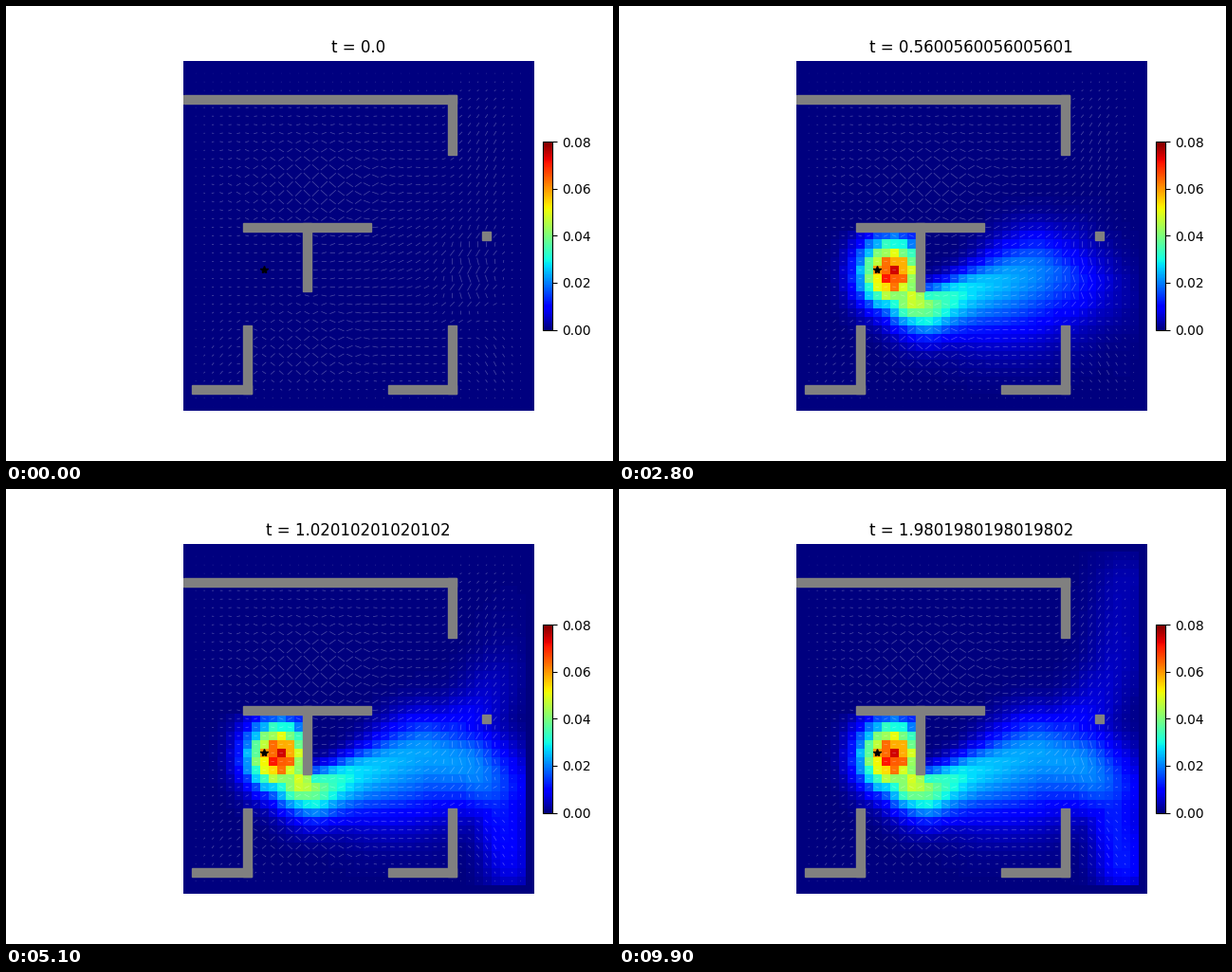
These frames come from a looping animation (640 px wide and 480 px high, 10 s). A matplotlib script:

```python
import numpy as np
import matplotlib.pyplot as plt
from matplotlib.animation import FuncAnimation
from matplotlib.patches import Rectangle

N = 41
FRAMES = 100
VMAX = 0.08
TIMES = np.linspace(0, 2, 10000)[::100]
SOURCE = (9, 24)

# first and last cell of each wall: column, row, column, row
WALLS = [
    (0, 4, 31, 4), (31, 4, 31, 10),
    (7, 19, 21, 19), (14, 19, 14, 26),
    (35, 20, 35, 20),
    (7, 31, 7, 38), (1, 38, 7, 38),
    (31, 31, 31, 38), (24, 38, 31, 38),
]

# key points of the two branches: arrival time, column, row
STREAM = [(.10, 13.3, 27.2), (.15, 14.8, 28), (.28, 20, 25.9),
          (.45, 27.5, 23.9), (.58, 32.5, 25.3), (.68, 36, 28.5),
          (.95, 37.6, 37)]
UPDRAFT = [(.55, 31, 22), (.75, 34, 19), (1.0, 36.5, 14), (1.4, 37.6, 4)]

row, col = np.mgrid[0:N, 0:N].astype(float)
edge = np.minimum(np.minimum(col, N - 1 - col), np.minimum(row, N - 1 - row))
check = (-1) ** (row + col)


def bump(c, r, sx, sy):
    return np.exp(-.5 * (((col - c) / sx) ** 2 + ((row - r) / sy) ** 2))


def step(t, at, width):
    return .5 * (1 + np.tanh((t - at) / width))


def trail(keys, level, up, down):
    """Steady profile around samples of a path, with their arrival times."""
    when, cs, rs = np.transpose(keys)
    t = np.linspace(when[0], when[-1], 80)[:, None, None]
    dx = col - np.interp(t, when, cs)
    dy = row - np.interp(t, when, rs)
    w = np.where(dy > 0, down(t), up(t))
    return level(t) * np.exp(-.5 * (dx ** 2 + dy ** 2) / w ** 2), t


TRAILS = [
    trail(STREAM,
          lambda t: .27 + .36 * np.exp((.1 - t) / .115)
          - .12 * step(t, .66, .05),
          lambda t: 1.3 + 2 * step(t, .36, .09) - step(t, .74, .06),
          lambda t: 2.2 + 2.7 * np.exp(-((t - .42) / .2) ** 2)),
    trail(UPDRAFT,
          lambda t: .045 + .13 * np.exp((.55 - t) / .2),
          lambda t: 2.5, lambda t: 2.5),
]
above_bar = (row < 20) & (col < 22)
BLOB = .89 * bump(10.7, 24.4, 2.5, 2.7) * (1 - .06 * check)
BLOB *= (row >= 20) & ((col < 14) | (row > 26))


def density(t):
    spread = 1 - np.exp(-t / .05)
    out = BLOB * (1 - np.exp(-t / .07))
    for shape, arrive in TRAILS:
        front = step(t, arrive, .05 + .16 * arrive)
        plume = (shape * front).max(axis=0) * spread
        out = np.maximum(out, np.where(above_bar, 0, plume))
    return VMAX * out * (edge > 0)


def wind():
    swirl = bump(33.5, 25.5, 3, 4)
    u = .25 + .5 * bump(17, 13, 9, 5) + .4 * bump(24, 26, 9, 6)
    u += .3 * bump(16, 34, 7, 4)
    u *= 1 - .9 * swirl
    u += .4 * (-1) ** row * swirl
    v = .75 * check * bump(14.5, 14, 6, 3.8)
    v += .55 * check * bump(13.5, 34, 5, 4.5)
    v += .6 * bump(35, 11, 3, 6) + .3 * bump(26, 21, 6, 4)
    v += .35 * bump(3, 34, 3, 4) - .6 * bump(36, 34, 2.5, 5)
    v += .85 * swirl
    fade = np.clip(edge / 4, 0, 1) * np.where((row < 4) & (col < 32), .5, 1)
    return u * fade, v * fade


fig, ax = plt.subplots(figsize=(6.4, 4.8), dpi=100)
ax.axis("off")
im = ax.imshow(density(0), cmap="jet", vmin=0, vmax=VMAX,
               interpolation="nearest")
fig.colorbar(im, ax=ax, fraction=.02, pad=.02)
ax.quiver(col, row, *wind(), color="white", alpha=.3, pivot="mid",
          angles="uv", units="width", width=.002, scale=N,
          scale_units="width", headwidth=1, headlength=0,
          headaxislength=0, minlength=.3)
for c0, r0, c1, r1 in WALLS:
    ax.add_patch(Rectangle((c0 - .5, r0 - .5), c1 - c0 + 1, r1 - r0 + 1,
                           color="gray", zorder=4))
ax.plot(*SOURCE, "k*", markersize=6, zorder=5)
ax.set_xlim(-.5, N - .5)
ax.set_ylim(N - .5, -.5)
title = ax.set_title("t = 0.0")


def update(i):
    t = float(TIMES[i])
    im.set_data(density(t))
    title.set_text(f"t = {t}")
    return im, title


anim = FuncAnimation(fig, update, frames=FRAMES, interval=100,
                     repeat=True, repeat_delay=0, blit=False)
plt.show()
```
